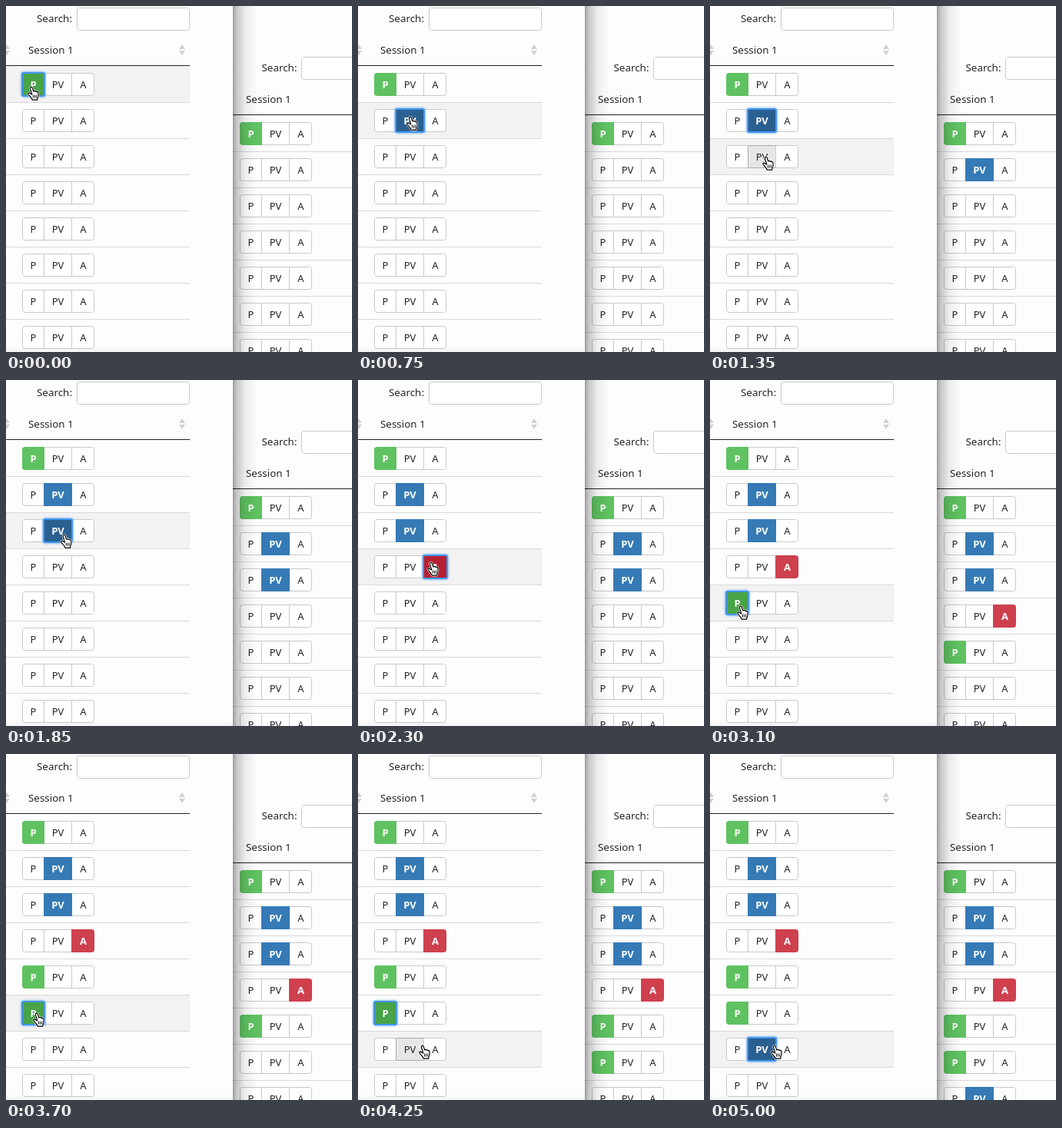
These frames come from a looping animation (450 px wide and 450 px high, 5.05 s). An HTML page with a canvas:

```html
<!DOCTYPE html>
<html lang="en">
<head>
<meta charset="utf-8">
<title>Attendance</title>
<style>
html, body { margin: 0; width: 100%; height: 100%; overflow: hidden; background: #fdfdfd; }
canvas { display: block; width: 450px; height: 450px; }
</style>
</head>
<body>
<canvas id="stage"></canvas>
<script>
const LOOP = 5050, STEP = 50, PITCH = 47;
const canvas = document.getElementById('stage');
const ctx = canvas.getContext('2d');
const dpr = window.devicePixelRatio || 1;
canvas.width = canvas.height = 450 * dpr;

const FONT = '"Noto Sans", "Open Sans", sans-serif';
const INK = '#222527';
const BUTTONS = [
  { label: 'P', x: 0, w: 28, on: '#5fc261', focus: '#48a447' },
  { label: 'PV', x: 28, w: 36, on: '#367ab5', focus: '#2a6090' },
  { label: 'A', x: 64, w: 30, on: '#ce404d', focus: '#b72031' }
];

// Each click: row, chosen button, time on the left pane, time on the right pane
const CLICKS = [
  { row: 0, pick: 0, at: 0, sync: 0 },
  { row: 1, pick: 1, at: 700, sync: 950 },
  { row: 2, pick: 1, at: 1550, sync: 1800 },
  { row: 3, pick: 2, at: 2250, sync: 2500 },
  { row: 4, pick: 0, at: 2850, sync: 3050 },
  { row: 5, pick: 0, at: 3650, sync: 3900 },
  { row: 6, pick: 1, at: 4700, sync: 4950 }
];

// Pointer moves: start, end, destination
const HOME = [28, 104];
const MOVES = [
  [150, 600, 63, 143],
  [950, 1350, 68, 195],
  [1750, 2200, 90, 236],
  [2400, 2800, 35, 293],
  [3150, 3550, 35, 336],
  [3850, 4250, 79, 378]
];

const HAND = new Path2D('M5.8 11 L3.5 3.4 C2.9 1.2 5.5 .4 6.2 2.4 L7.8 7 ' +
  'C8.5 6 9.9 6.2 10.1 7.2 C11 6.5 12 6.8 12.2 7.9 C13.3 7.4 14.1 8.1 14 9.2 ' +
  'L13.9 13 C13.6 14.7 12.8 15.5 12.7 18.2 L6.3 18.2 C6 16.2 4.4 15.4 3.2 13.6 ' +
  'C2.3 12.2 .5 11 .8 9.9 C1.3 8.6 2.9 9.1 3.8 10 Z');

function pointer(t) {
  let [x, y] = HOME;
  for (const [from, to, nx, ny] of MOVES) {
    const p = Math.min(1, Math.max(0, (t - from) / (to - from)));
    const e = p * p * (3 - 2 * p);
    x += (nx - x) * e;
    y += (ny - y) * e;
  }
  return { x, y };
}

function rect(x, y, w, h, color) {
  ctx.fillStyle = color;
  ctx.fillRect(x, y, w, h);
}

function box(x, y, w, h, r, fill, border) {
  ctx.beginPath();
  ctx.roundRect(x + .5, y + .5, w - 1, h - 1, r);
  ctx.fillStyle = fill;
  ctx.fill();
  ctx.strokeStyle = border;
  ctx.lineWidth = 1;
  ctx.stroke();
}

function text(str, x, y, size, color = INK, weight = 400, align = 'left') {
  ctx.font = `${weight} ${size}px ${FONT}`;
  ctx.textAlign = align;
  ctx.fillStyle = color;
  ctx.fillText(str, x, y);
}

function sorter(x) {
  ctx.fillStyle = '#d0d0d0';
  for (const dir of [-1, 1]) {
    const y = 57 + dir;
    ctx.beginPath();
    ctx.moveTo(x - 4, y);
    ctx.lineTo(x + 4, y);
    ctx.lineTo(x, y + dir * 6);
    ctx.fill();
  }
}

function group(x, y, chosen, focused, hover) {
  box(x, y, 94, 30, 3, '#fff', '#c9c9c9');
  BUTTONS.forEach((b, i) => {
    const bx = x + b.x, on = i === chosen, lit = on && focused;
    const left = i === 0 ? 3 : 0, right = i === 2 ? 3 : 0;
    const corners = [left, right, right, left];
    if (lit) {
      ctx.save();
      ctx.shadowColor = '#4b9df5';
      ctx.shadowBlur = 3 * dpr;
      box(bx - 1, y - 1, b.w + 3, 32, 2, '#4595ee', '#4595ee');
      ctx.restore();
      rect(bx + 1, y + 1, b.w - 1, 28, b.focus);
    } else if (on) {
      box(bx, y, b.w + (i < 2 ? 1 : 0), 30, corners, b.on, b.on);
    } else if (i === hover) {
      box(bx, y, b.w + (i < 2 ? 1 : 0), 30, corners, '#e6e6e6', '#adadad');
    } else if (i && i - 1 !== chosen) {
      rect(bx, y + 1, 1, 28, '#c9c9c9');
    }
    text(b.label, bx + b.w / 2 + .5, y + 19.5, 13, on ? '#fff' : INK, on ? 700 : 400, 'center');
  });
}

function pick(row, t, key) {
  const c = CLICKS.find(c => c.row === row && t >= c[key]);
  return c ? c.pick : -1;
}

function header(x, y) {
  text('Search:', x + 40, y + 21, 13.4);
  text('Session 1', x + 29, y + 62, 13.4);
}

function rightPane(t) {
  rect(295, 0, 155, 450, '#fdfdfd');
  text('Search:', 332.5, 85, 13.4);
  box(384, 66, 147, 30, 3, '#fff', '#c9c9c9');
  text('Session 1', 312, 126, 13.4);
  rect(295, 141, 155, 1, '#222');
  for (let r = 0; r < 7; r++) {
    rect(295, 189 + r * PITCH, 155, 1, '#d9d9d9');
    group(304, 151 + r * PITCH, pick(r, t, 'sync'), false, -1);
  }
  const shade = ctx.createLinearGradient(295, 0, 327, 0);
  shade.addColorStop(0, 'rgba(0,0,0,.38)');
  shade.addColorStop(.15, 'rgba(0,0,0,.22)');
  shade.addColorStop(.5, 'rgba(0,0,0,.07)');
  shade.addColorStop(1, 'rgba(0,0,0,0)');
  rect(295, 0, 32, 450, shade);
}

function leftPane(t, tip) {
  rect(0, 0, 295, 450, '#fdfdfd');
  header(0, 0);
  box(92, 2, 147, 30, 3, '#fff', '#c9c9c9');
  sorter(1);
  sorter(229);
  const hoverRow = Math.floor((tip.y - 78) / PITCH);
  const hoverBtn = BUTTONS.findIndex(b => tip.x >= 21 + b.x && tip.x < 21 + b.x + b.w);
  const last = CLICKS.filter(c => t >= c.at).pop();
  rect(0, 78 + hoverRow * PITCH, 239, PITCH, '#f2f2f2');
  rect(0, 77, 239, 1, '#222');
  for (let r = 0; r < 8; r++) {
    const y = 87 + r * PITCH;
    rect(0, y + 38, 239, 1, '#d9d9d9');
    const over = r === hoverRow && tip.y >= y && tip.y < y + 30;
    group(21, y, pick(r, t, 'at'), r === last.row, over ? hoverBtn : -1);
  }
  const foot = ctx.createLinearGradient(0, 442, 0, 450);
  foot.addColorStop(0, 'rgba(0,0,0,0)');
  foot.addColorStop(1, 'rgba(0,0,0,.04)');
  rect(0, 442, 295, 8, foot);
}

function hand({ x, y }) {
  ctx.save();
  ctx.translate(x, y);
  ctx.lineJoin = ctx.lineCap = 'round';
  ctx.strokeStyle = '#fff';
  ctx.lineWidth = 2.4;
  ctx.stroke(HAND);
  ctx.fillStyle = '#fff';
  ctx.fill(HAND);
  ctx.strokeStyle = '#000';
  ctx.lineWidth = 1.2;
  ctx.stroke(HAND);
  ctx.lineWidth = .9;
  ctx.beginPath();
  for (const k of [7.4, 9.4, 11.4]) {
    ctx.moveTo(k, 12);
    ctx.lineTo(k + .1, 15.2);
  }
  ctx.stroke();
  ctx.restore();
}

function draw(t) {
  ctx.setTransform(dpr, 0, 0, dpr, 0, 0);
  const p = pointer(t);
  rightPane(t);
  leftPane(t, { x: p.x + 4, y: p.y + 2 });
  hand(p);
}

const start = performance.now();
function tick() {
  const t = (performance.now() - start) % LOOP;
  draw(Math.floor(t / STEP) * STEP);
  requestAnimationFrame(tick);
}
tick();
</script>
</body>
</html>
```
